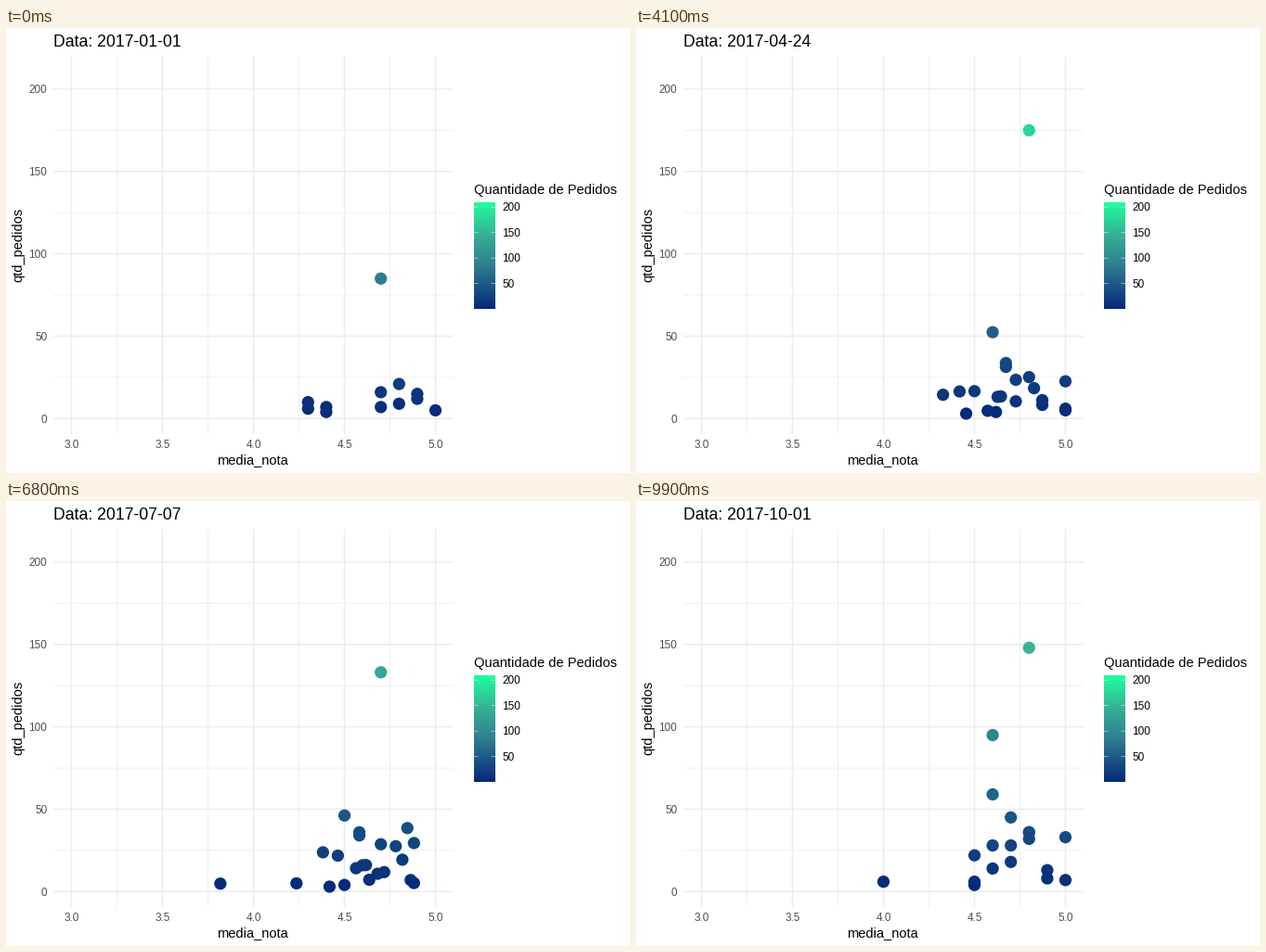
Write a matplotlib script that moves like this. It is 672 px wide and 480 px high and loops after 10 s.

```python
import numpy as np
import matplotlib.pyplot as plt
from matplotlib.animation import FuncAnimation
from matplotlib.colors import LinearSegmentedColormap

plt.rcParams["font.family"] = "Liberation Sans"

W, H, FRAMES = 672, 480, 100
START, DAYS, MONTHS = np.datetime64("2017-01-01"), 273, 10
Y_MIN, Y_MAX = 1, 210

firsts = np.arange("2017-01", "2017-11", dtype="datetime64[M]").astype("datetime64[D]")
KEYS = np.round((firsts - START).astype(int) * (FRAMES - 1) / DAYS).astype(int)

# Three states with a story of their own: ratings and orders by month
STANDOUTS = [
    ([4.7, 4.6, 4.6, 4.8, 4.8, 4.8, 4.7, 4.7, 4.7, 4.8],
     [85, 210, 168, 135, 190, 109, 124, 174, 178, 148]),
    ([4.8, 4.6, 4.6, 4.6, 4.6, 4.9, 4.5, 4.5, 4.7, 4.6],
     [21, 27, 29, 35, 59, 25, 42, 65, 76, 95]),
    ([4.3, 4.3, 4.2, 4.4, 4.3, 4.2, 4.0, 3.0, 5.0, 4.0],
     [6, 10, 12, 13, 15, 10, 5, 4, 5, 6]),
]
ACTIVE = [12, 17, 18, 21, 22, 22, 23, 23, 23, 19]


def crowd(n=20, seed=7):
    """Small states: orders grow steadily, ratings dip in midyear."""
    rng = np.random.default_rng(seed)
    i, m = np.arange(n)[:, None], np.arange(MONTHS)
    size = (0.5 + i * 0.618) % 1
    quality = (0.3 + i * 0.755) % 1 - 0.5
    peak = 15 + 4 * m
    orders = 3 + peak * size ** 1.4 * rng.uniform(0.8, 1.2, (n, MONTHS))
    center = 4.77 - 0.16 * np.exp(-((m - 7) / 1.5) ** 2)
    ratings = center + 0.55 * quality + rng.normal(0, 0.1, (n, MONTHS))
    return np.stack([np.clip(ratings, 4, 5).round(1), orders.round()], axis=-1)


tracks = np.concatenate([np.swapaxes(np.array(STANDOUTS), 1, 2), crowd()])

scale = LinearSegmentedColormap.from_list("orders", [
    (0, "#05287A"), (0.4, "#2F7D90"), (0.7, "#34B296"), (1, "#20FF9C")])


def scale_color(orders):
    return scale((np.asarray(orders) - Y_MIN) / (Y_MAX - Y_MIN))


def px(rating):
    return 70.5 + (rating - 3) * 196


def py(orders):
    return 421.3 - orders * 1.777


fig = plt.figure(figsize=(W / 96, H / 96), dpi=96, facecolor="white")
ax = fig.add_axes([0, 0, 1, 1])
ax.axis("off")

LEFT, RIGHT, TOP, BOTTOM = 51, 481.7, 30.5, 438


def line(xs, ys, lw, color="#EBEBEB", **kw):
    ax.plot(xs, ys, color=color, lw=lw, snap=False, solid_capstyle="butt", **kw)


def grid(xs, ys, lw):
    for y in ys:
        line([LEFT, RIGHT], [py(y)] * 2, lw, zorder=1)
    for x in xs:
        line([px(x)] * 2, [TOP, BOTTOM], lw, zorder=1)


def label(x, y, text, size=11, ha="left", color="black", **kw):
    return ax.text(x, y, text, fontsize=size, ha=ha, va="baseline",
                   color=color, **kw)


x_ticks, y_ticks = np.arange(3, 5.1, 0.5), np.arange(0, 201, 50)
grid(x_ticks[:-1] + 0.25, y_ticks[:-1] + 25, 0.53)
grid(x_ticks, y_ticks, 1.07)
for v in x_ticks:
    label(px(v), 453.2, f"{v:.1f}", 8.8, "center", "#4D4D4D")
for v in y_ticks:
    label(44.3, py(v) + 4.3, str(v), 8.8, "right", "#4D4D4D")
label(265.5, 470, "media_nota", ha="center")
label(17, 233.5, "qtd_pedidos", ha="center", rotation=90,
      rotation_mode="anchor")

# Legend
BAR_L, BAR_R, BAR_T, BAR_B = 504, 527, 188, 303
ramp = scale_color(np.linspace(Y_MAX, Y_MIN, 256))[:, None, :]
ax.imshow(ramp, extent=(BAR_L, BAR_R, BAR_B, BAR_T), aspect="auto",
          interpolation="bilinear", zorder=2)
ax.set(xlim=(0, W), ylim=(H, 0))
label(503.6, 179.2, "Quantidade de Pedidos")
for v in y_ticks[1:]:
    y = 302.7 - (v - Y_MIN) / (Y_MAX - Y_MIN) * 115
    for a, b in ((BAR_L, BAR_L + 4.6), (BAR_R - 4.6, BAR_R)):
        line([a, b], [y, y], 0.5, "white", alpha=0.7, zorder=3)
    label(534.3, y + 4.2, str(v), 8.8)

title = label(50.6, 20.3, "", 13.2)
dots = ax.scatter([], [], s=99, linewidths=0, zorder=4)


def state(i):
    k = int(np.searchsorted(KEYS, i))
    if KEYS[k] == i:
        return tracks[:ACTIVE[k], k]
    n = min(ACTIVE[k - 1], ACTIVE[k])  # unmatched states show only on their month
    t = (i - KEYS[k - 1]) / (KEYS[k] - KEYS[k - 1])
    return tracks[:n, k - 1] * (1 - t) + tracks[:n, k] * t


def update(i):
    rating, orders = state(i).T
    dots.set_offsets(np.column_stack([px(rating), py(orders)]))
    dots.set_facecolor(scale_color(orders))
    title.set_text(f"Data: {START + i * DAYS // (FRAMES - 1)}")
    return dots, title


anim = FuncAnimation(fig, update, frames=FRAMES, interval=100, repeat=True,
                     repeat_delay=0, blit=False)
plt.show()
```
